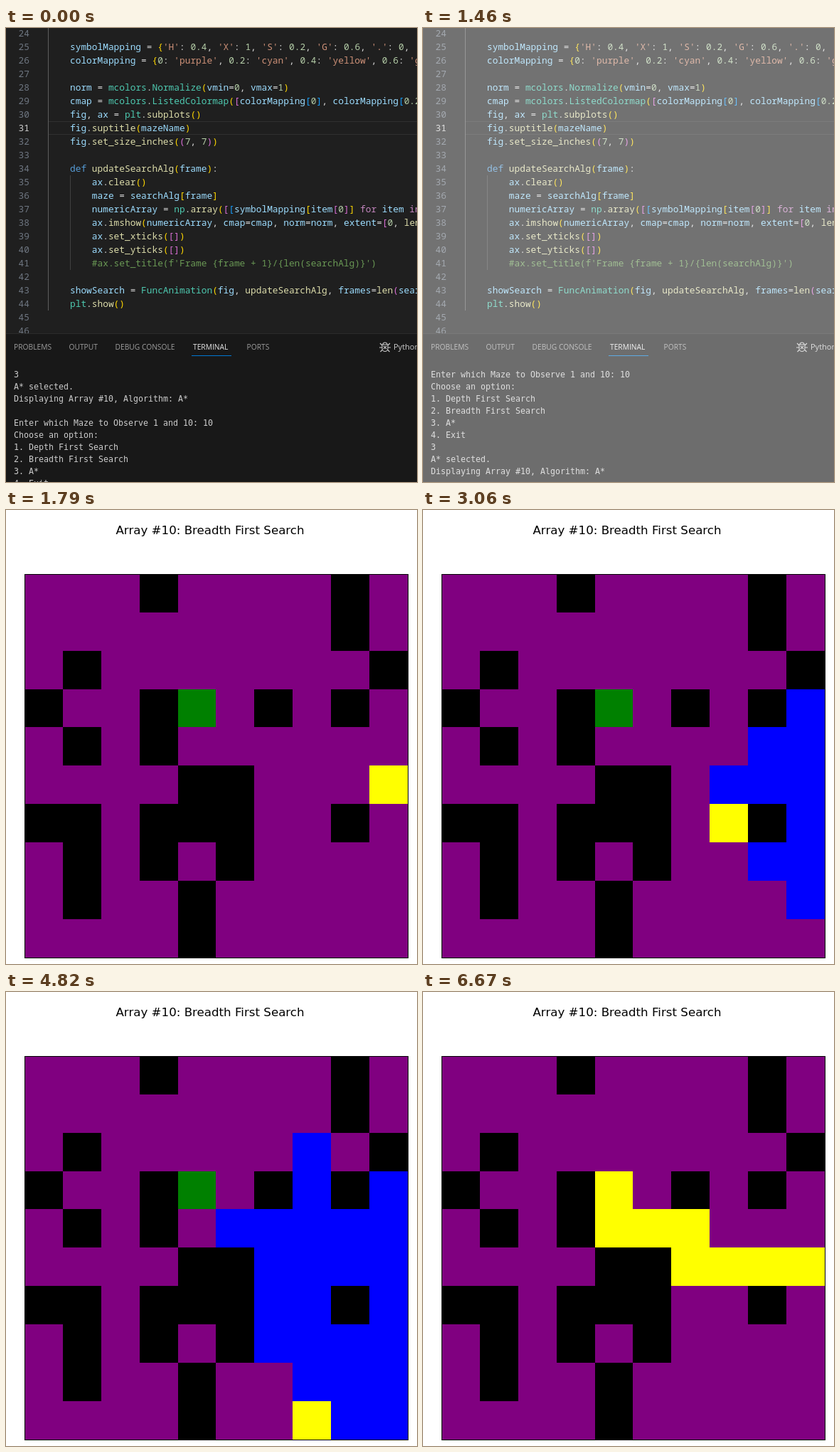
An HTML page for the animation above (7.65 s loop, 578 by 638 pixels).

```html
<!DOCTYPE html>
<html lang="en">
<head>
<meta charset="utf-8">
<title>Breadth first search</title>
<style>
  html, body { margin: 0; width: 100%; height: 100%; overflow: hidden; background: #fff; }
  svg { display: block; width: 578px; height: 638px; }
  text { white-space: pre; }
  .code { font: 12.83px "Noto Sans Mono", monospace; fill: #d4d4d4; }
  .term { font: 11.63px "DejaVu Sans Mono", monospace; fill: #ccc; }
  .tab { font: 10.25px "Open Sans", sans-serif; fill: #9d9d9d; }
  .title { font: 16.67px "DejaVu Sans", sans-serif; text-anchor: middle; }
</style>
</head>
<body>
<svg viewBox="0 0 578 638">
  <g id="editor"></g>
  <rect id="veil" width="578" height="638" fill="#fff"/>
  <g id="plot"></g>
</svg>
<script>
const LOOP = 7650;
const $ = id => document.getElementById(id);
const editor = $('editor'), veil = $('veil'), plot = $('plot');

function add(parent, tag, attrs = {}, text) {
  const el = document.createElementNS('http://www.w3.org/2000/svg', tag);
  for (const k in attrs) el.setAttribute(k, attrs[k]);
  if (text !== undefined) el.textContent = text;
  parent.appendChild(el);
  return el;
}
const rect = (parent, x, y, width, height, fill) =>
  add(parent, 'rect', { x, y, width, height, fill });

// ---- Code editor ----
const FIRST_LINE = 24;
const code = `

    symbolMapping = {'H': 0.4, 'X': 1, 'S': 0.2, 'G': 0.6, '.': 0, ' ': 0}
    colorMapping = {0: 'purple', 0.2: 'cyan', 0.4: 'yellow', 0.6: 'green'}

    norm = mcolors.Normalize(vmin=0, vmax=1)
    cmap = mcolors.ListedColormap([colorMapping[0], colorMapping[0.2]])
    fig, ax = plt.subplots()
    fig.suptitle(mazeName)
    fig.set_size_inches((7, 7))

    def updateSearchAlg(frame):
        ax.clear()
        maze = searchAlg[frame]
        numericArray = np.array([[symbolMapping[item[0]] for item in row]])
        ax.imshow(numericArray, cmap=cmap, norm=norm, extent=[0, len(maze)])
        ax.set_xticks([])
        ax.set_yticks([])
        #ax.set_title(f'Frame {frame + 1}/{len(searchAlg)}')

    showSearch = FuncAnimation(fig, updateSearchAlg, frames=len(searchAlg))
    plt.show()

`.split('\n').slice(1);

const TYPES = /^(mcolors|Normalize|ListedColormap|plt|np|FuncAnimation)$/;
const BRACKETS = ['#ffd700', '#da70d6', '#179fff'];

function colorOf(token, rest) {
  if (token[0] === '#') return '#6a9955';
  if (token[0] === "'") return '#ce9178';
  if (/^\d/.test(token)) return '#b5cea8';
  if (!/^\w/.test(token)) return '#d4d4d4';
  if (token === 'def') return '#569cd6';
  if (token === 'for' || token === 'in') return '#c586c0';
  if (TYPES.test(token)) return '#4ec9b0';
  if (rest[0] === '(' || token === 'updateSearchAlg') return '#dcdcaa';
  return '#9cdcfe';
}

function codeLine(src, y) {
  const indent = src.search(/\S/);
  if (indent < 0) return;
  const line = add(editor, 'text', { class: 'code', x: 59.2 + indent * 7.7, y });
  let depth = 0;
  for (const m of src.trim().matchAll(/#.*|'[^']*'|\d+(\.\d+)?|\w+|\s+|./g)) {
    const token = m[0];
    let fill;
    if ('([{'.includes(token)) fill = BRACKETS[depth++ % 3];
    else if (')]}'.includes(token)) fill = BRACKETS[--depth % 3];
    else fill = colorOf(token, m.input.slice(m.index + token.length));
    add(line, 'tspan', { fill }, token);
  }
}

rect(editor, 0, 0, 578, 638, '#1f1f1f');
rect(editor, 60, 131, 518, 1, '#303030');
rect(editor, 60, 149, 518, 1, '#303030');
rect(editor, 59, 0, 1, 397, '#5c5c5c');
rect(editor, 90, 207, 1, 133, '#404040');
code.forEach((src, i) => {
  const n = FIRST_LINE + i, y = 12 + 19 * i;
  add(editor, 'text', { class: 'code', x: 17.5, y, style: `fill:${n === 31 ? '#ccc' : '#6e7681'}` }, n);
  codeLine(src, y);
});

// ---- Panel and terminal ----
rect(editor, 0, 429, 578, 209, '#181818');
rect(editor, 0, 429, 578, 1, '#2b2b2b');
[['PROBLEMS', 11], ['OUTPUT', 88.5], ['DEBUG CONSOLE', 153.5], ['TERMINAL', 263], ['PORTS', 338.5]]
  .forEach(([name, x]) => add(editor, 'text',
    { class: 'tab', x, y: 452, style: name === 'TERMINAL' ? 'fill:#e7e7e7' : '' }, name));
rect(editor, 261, 460, 56, 1, '#0078d4');
add(editor, 'path', {
  d: 'M529 445h8v5a4 4.5 0 0 1-8 0zM530 445a3 3 0 0 1 6 0M529 446l-3-3M537 446l3-3' +
     'M529 449h-4M537 449h4M529.5 452l-3 3M536.5 452l3 3M531 447l4 4M535 447l-4 4',
  fill: 'none', stroke: '#ccc', 'stroke-width': 1.1
});
add(editor, 'text', { class: 'tab', x: 545, y: 451.5, style: 'fill:#ccc;font-size:11px' }, 'Python');

const answer = ['3', 'A* selected.', 'Displaying Array #10, Algorithm: A*'];
const log = [...answer, '', 'Enter which Maze to Observe 1 and 10: 10', 'Choose an option:',
  '1. Depth First Search', '2. Breadth First Search', '3. A*', '4. Exit', ...answer];
const rows = Array.from({ length: 10 }, (_, i) =>
  add(editor, 'text', { class: 'term', x: 11, y: 491 + 17 * i }));
const scrollTo = top => rows.forEach((row, i) => { row.textContent = log[top + i] ?? ''; });

// ---- Maze ----
const maze = [
  '...#....#.',
  '........#.',
  '.#.......#',
  '#..#G.#.#.',
  '.#.#......',
  '....##...S',
  '##.###..#.',
  '.#.#.#....',
  '.#..#.....',
  '....#.....'
].join('');
const start = maze.indexOf('S'), goal = maze.indexOf('G');

function search() {
  const from = { [start]: -1 }, queue = [start], seen = [];
  for (let at; (at = queue.shift()) !== goal;) {
    seen.push(at);
    const r = Math.floor(at / 10), c = at % 10;
    for (const [dr, dc] of [[1, 0], [0, 1], [0, -1], [-1, 0]]) {
      const y = r + dr, x = c + dc, next = y * 10 + x;
      if (y < 0 || y > 9 || x < 0 || x > 9 || maze[next] === '#' || next in from) continue;
      from[next] = at;
      queue.push(next);
    }
  }
  const path = [];
  for (let at = goal; at >= 0; at = from[at]) path.unshift(at);
  return { seen, path };
}
const { seen, path } = search();

const edgeX = i => Math.round(25.95 + 53.9 * i);
const edgeY = i => Math.round(89.85 + 53.9 * i);
rect(plot, 0, 0, 578, 638, '#fff');
add(plot, 'text', { class: 'title', x: 287, y: 34 }, 'Array #10: Breadth First Search');
const cells = [...maze].map((_, i) => {
  const c = i % 10, r = Math.floor(i / 10), x = edgeX(c), y = edgeY(r);
  return rect(plot, x, y, edgeX(c + 1) - x, edgeY(r + 1) - y, '#800080');
});
add(plot, 'rect', { x: 26.5, y: 90.5, width: 539, height: 539, fill: 'none', stroke: '#000' });

function showMaze(step) {
  const searching = step < seen.length;
  const visited = searching ? seen.slice(0, step) : [];
  const lit = searching ? [seen[step]] : path.slice(0, step - seen.length + 1);
  cells.forEach((cell, i) => cell.setAttribute('fill',
    maze[i] === '#' ? '#000' :
    lit.includes(i) ? '#ff0' :
    visited.includes(i) ? '#00f' :
    i === goal ? '#008000' : '#800080'));
}

// ---- Timeline ----
const run = (a, b, n) => Array.from({ length: n }, (_, i) => a + (b - a) * i / (n - 1));
const ticks = [
  1790, 1920, ...run(2050, 2770, 7), 2900, 3060, ...run(3100, 3750, 6),
  3880, 4010, 4080, 4350, 4390, ...run(4480, 5080, 6), 5210, 5360, 5410,
  ...run(5560, 6280, 7), 6410, 6540, 6670
];
const fades = [[1430, 0.15], [1460, 0.37], [1520, 0.75], [1560, 0.95], [1650, 1]];

let last;
function draw(t) {
  const step = ticks.filter(at => at <= t).length - 1;
  const fade = fades.filter(([at]) => at <= t).pop()?.[1] ?? 0;
  const top = t < 1260 ? 0 : 4;
  const key = [step, fade, top].join();
  if (key === last) return;
  last = key;
  scrollTo(top);
  veil.setAttribute('opacity', fade);
  plot.style.display = step < 0 ? 'none' : '';
  if (step >= 0) showMaze(step);
}

const t0 = performance.now();
function tick() {
  draw((performance.now() - t0) % LOOP);
  requestAnimationFrame(tick);
}
tick();
</script>
</body>
</html>
```
